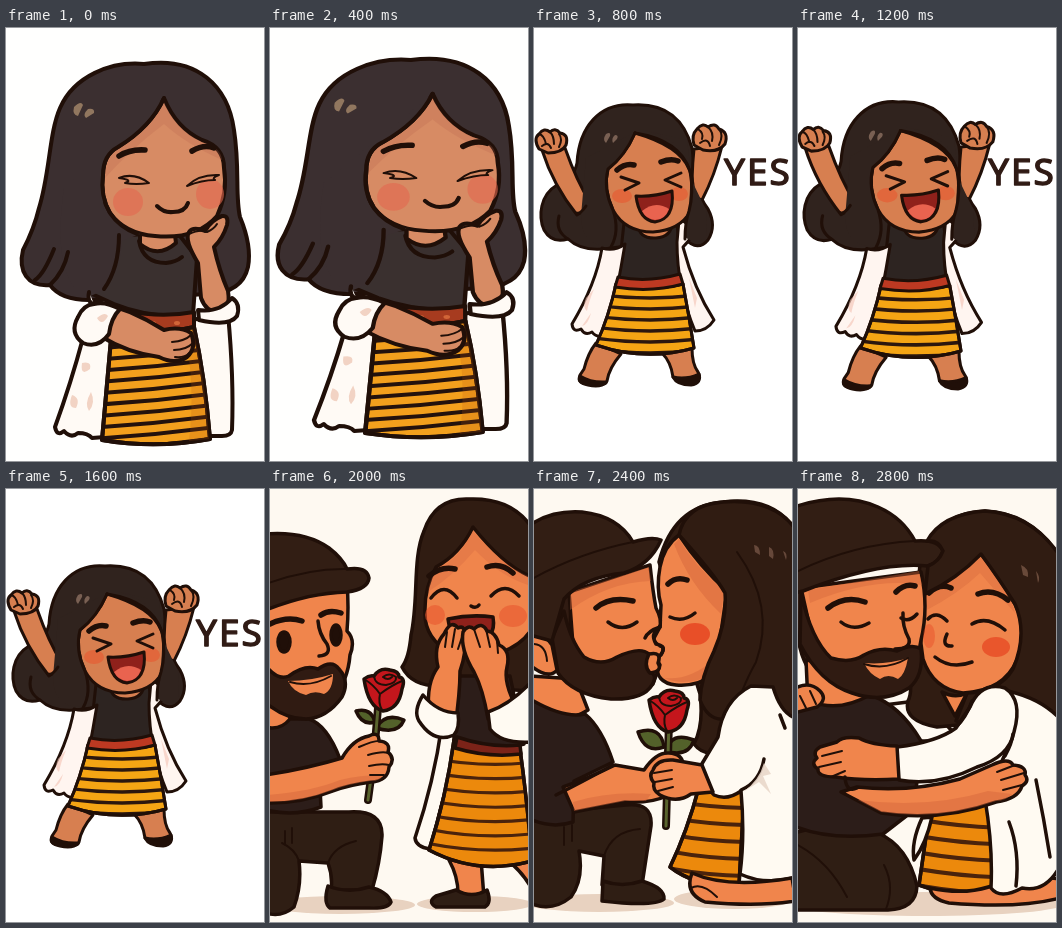
These frames come from a looping animation (258 by 433 pixels, 3.2 s). An HTML page:

```html
<!DOCTYPE html>
<html lang="en">
<head>
<meta charset="utf-8">
<title>Yes!</title>
<style>
html, body { margin: 0; width: 100%; height: 100%; overflow: hidden; background: #fff; }
svg { display: block; width: 100vw; height: 100vh; }
path, ellipse { stroke: #200f08; stroke-width: var(--pen); stroke-linecap: round; stroke-linejoin: round; }
.hair { fill: var(--hair); }
.skin { fill: var(--skin); }
.top { fill: var(--top); }
.robe { fill: var(--robe); }
.skirt { fill: var(--skirt); }
.belt { fill: var(--belt); }
.pants { fill: #2f1e14; }
.cap { fill: #321e14; }
.beard { fill: #301b12; }
.rose { fill: #c4161c; }
.leaf { fill: #53612a; }
.mouth { fill: #8f211b; }
.ink { fill: #200f08; }
.line { fill: none; }
.thin { fill: none; stroke-width: 2; }
.bands { fill: none; stroke: var(--band); }
.brow { fill: none; stroke-width: 5.5; }
.soft { stroke: none; }
text { font: 400 37px "Noto Sans", "Open Sans", sans-serif; letter-spacing: 2px; fill: #301b15; stroke: #301b15; stroke-width: 1.4; stroke-linejoin: round; }
</style>
</head>
<body>
<svg id="stage" viewBox="0 0 258 433" preserveAspectRatio="none"></svg>
<script>
let clipCount = 0;

const path = (kind, d) => `<path class="${kind}" d="${d}"/>`;
const oval = (kind, x, y, rx, ry = rx) => `<ellipse class="${kind}" cx="${x}" cy="${y}" rx="${rx}" ry="${ry}"/>`;
const tint = (color, opacity, d) => `<path class="soft" fill="${color}" opacity="${opacity}" d="${d}"/>`;
const blush = (x, y, rx, ry, color = '#e8562f', opacity = .6) =>
  `<ellipse class="soft" cx="${x}" cy="${y}" rx="${rx}" ry="${ry}" fill="${color}" opacity="${opacity}"/>`;
const ground = (x, y, rx, ry) => blush(x, y, rx, ry, '#e8d2c0', 1);

// A skirt with evenly spaced bands; x, y, dx, dy, bend describe the first band.
function skirt(d, { x, y, dx, dy, bend, step, count, width }) {
  const id = 'skirt' + clipCount++;
  let bands = '';
  for (let i = 0; i < count; i++)
    bands += `M${x} ${y + i * step}q${dx / 2} ${dy / 2 + bend} ${dx} ${dy}`;
  return `<clipPath id="${id}"><path d="${d}"/></clipPath>` + path('skirt', d) +
    `<path class="bands" clip-path="url(#${id})" style="stroke-width:${width}" d="${bands}"/>` + path('line', d);
}

const stem = d => `<path class="line" style="stroke-width:8" d="${d}"/><path class="line" style="stroke:#59632d;stroke-width:3" d="${d}"/>`;

const rose = (x, y) => `<g transform="translate(${x} ${y})">` +
  path('rose', 'M-20 -10Q-15 -14 -10 -13Q-4 -22 6 -19Q15 -18 15 -12Q22 -11 18 0Q15 20 -1 22Q-16 18 -20 -10Z') +
  path('thin', 'M-20 -10Q-10 -4 -4 5Q8 -4 18 -8M-10 -13Q-9 -4 2 -4Q13 -6 12 -12Q5 -17 -1 -12Q4 -8 8 -12M-4 5Q-6 14 -2 21') + '</g>';

const style = (pen, hair, skin, top, robe, yellow, belt, band) =>
  `--pen:${pen};--hair:${hair};--skin:${skin};--top:${top};--robe:${robe};--skirt:${yellow};--belt:${belt};--band:${band}`;
const scene = (look, background, parts) =>
  `<g style="${look}"><rect width="258" height="433" fill="${background}"/>${parts.join('')}</g>`;
const move = (transform, parts) => [`<g transform="${transform}">`, ...parts, '</g>'];

const dreaming = [
  path('hair', 'M138 36C105 33 68 48 54 80C43 105 44 145 33 180Q28 201 17 222C12 243 21 259 44 257Q55 272 83 272L202 266Q236 265 242 239Q246 218 234 189C229 168 234 140 228 102C222 58 191 28 138 36Z'),
  path('robe', 'M77 310Q65 355 49 399Q51 409 58 403Q65 411 72 405Q82 405 86 410L99 409L109 300Z'),
  path('robe', 'M185 292L222 286Q228 350 226 402Q225 408 216 408H201Z'),
  path('top', 'M108 208L139 206L174 208L191 230L187 287Q145 291 108 276L86 266Z'),
  path('skin', 'M134 200V216Q152 231 170 215L168 199Z'),
  path('line', 'M133 213Q137 235 160 235Q170 234 176 229'),
  path('skin', 'M158 70Q145 99 112 119Q97 127 97 147Q94 168 104 185Q119 206 149 208Q190 212 211 188Q222 165 218 140Q218 119 196 112Q170 100 158 70Z'),
  tint('#b9664b', .25, 'M158 74Q145 103 112 121Q100 128 99 150Q125 121 158 96Q180 116 216 132Q215 119 196 114Q170 102 158 74Z'),
  blush(122, 174, 15, 14, '#e3684f', .6), blush(204, 166, 14, 15, '#e3684f', .6),
  path('hair soft', 'M158 70Q138 102 110 121Q99 128 97 146V180Q111 198 134 206L116 213Q114 242 98 262L80 270Q45 250 58 160Z'),
  path('line', 'M158 70Q145 99 112 119Q97 127 97 147Q94 168 104 185Q113 199 131 206M113 207Q113 240 98 261M62 224Q58 244 44 257M48 221Q38 246 29 252'),
  path('brow', 'M113 128Q124 121 139 122M186 123Q198 116 208 120'),
  path('ink thin', 'M113 150Q128 144 143 155Q130 157 119 155Q128 152 113 150ZM181 158Q193 146 213 147Q205 150 209 152Q196 152 181 158Z'),
  path('line', 'M151 178Q158 185 167 184Q179 184 182 175'),
  path('skin', 'M192 235Q178 212 183 204Q187 198 199 203Q205 192 216 188Q223 187 221 197Q217 210 208 219Q213 242 222 263Q225 283 213 285Q200 284 195 270Z'),
  path('thin', 'M183 206Q194 201 201 204M201 204Q208 201 211 196'),
  path('robe', 'M192 282Q213 285 226 270Q235 276 231 288Q223 299 193 292Z'),
  path('belt', 'M120 283Q156 290 188 284L188 301Q153 306 110 301Z'),
  blush(146, 295, 4, 2, '#dd713e', .8), blush(171, 295, 3, 2, '#dd713e', .8),
  skirt('M106 300Q150 308 188 299Q199 350 204 411Q150 421 96 412Z',
    { x: 94, y: 320, dx: 113, dy: -11, bend: 2, step: 11.3, count: 10, width: 4 }),
  tint('#b95610', .2, 'M187 301Q199 350 203 411L183 413Q190 355 178 303Z'),
  path('skin', 'M88 273Q123 280 158 302Q174 298 185 305Q191 320 181 329Q169 337 153 329Q122 325 96 309Z'),
  path('thin', 'M166 314Q179 313 185 307M168 322Q180 322 187 315M169 329Q179 330 183 325'),
  path('robe', 'M83 264Q81 275 88 276Q99 273 114 281Q105 290 103 306Q92 321 77 315Q63 305 72 289Q77 277 88 276'),
  tint('#e9b9a4', .6, 'M91 290Q99 283 102 288Q96 299 91 290ZM76 335Q86 333 84 341Q74 349 76 335ZM66 367Q75 370 70 380Q61 380 66 367ZM85 364Q90 375 83 383Q78 376 85 364Z'),
  tint('#91775f', 1, 'M68 79Q75 72 77 77L72 88Q66 87 68 79ZM82 81Q89 80 88 85L80 90Q76 87 82 81Z')
];

const cheering = [
  path('hair', 'M99 77C66 74 45 99 43 135Q40 151 23 157C6 167 4 188 10 202Q18 216 34 211Q49 225 77 220L151 211Q164 224 174 212Q183 198 174 181C160 163 161 142 158 120C150 91 131 75 99 77Z'),
  path('skin', 'M62 315Q54 325 50 341L46 347Q42 357 57 355Q71 359 73 353Q75 340 87 326Z'),
  path('skin', 'M128 325Q137 334 139 349Q148 355 160 354Q168 351 164 344Q158 336 158 320Z'),
  path('ink', 'M46 348Q57 355 72 354Q67 360 54 357Q43 355 46 348ZM139 349Q152 352 165 346Q168 355 157 357Q143 357 139 349Z'),
  path('top', 'M90 195H143L149 247Q113 256 84 250Z'),
  path('skin', 'M104 195Q104 211 122 210Q138 209 138 194Z'),
  path('robe', 'M68 220Q62 256 38 296Q39 305 47 301Q51 308 58 304Q63 311 73 307Q83 265 91 216Q80 224 68 220Z'),
  path('robe', 'M145 192Q157 193 156 211Q152 216 149 219Q160 261 180 292Q173 303 161 303Q143 260 143 214Z'),
  tint('#f4c7b9', .65, 'M60 261Q55 273 53 283Q48 279 52 270ZM57 285Q54 297 48 298ZM155 250L163 270L161 280Z'),
  skirt('M82 256Q115 264 149 256Q155 288 160 320Q112 334 62 317Q75 288 82 256Z',
    { x: 60, y: 266, dx: 105, dy: 1, bend: 7, step: 11, count: 6, width: 3.5 }),
  path('belt', 'M84 249Q114 255 146 246L149 256Q117 265 81 259Z'),
  path('skin', 'M8 122Q19 157 43 187Q54 182 56 174Q43 154 31 120Z'),
  path('skin', 'M159 169Q157 149 160 121L188 118Q181 147 168 172Z'),
  path('skin', 'M5 121Q-1 111 5 106Q10 99 16 104Q21 99 26 105Q35 106 32 117Q28 125 14 125Z'),
  path('thin', 'M5 106Q10 107 12 116M16 104Q20 108 20 116M25 106Q29 111 25 119M8 118Q14 113 17 120'),
  path('skin', 'M160 117Q157 107 163 101Q169 94 174 99Q181 94 185 101Q195 104 191 116Q184 125 169 122Z'),
  path('thin', 'M164 101Q170 105 168 111M174 99Q180 104 178 113M185 101Q190 107 185 117M166 115Q174 109 176 118'),
  path('skin', 'M101 105Q91 128 74 141Q69 161 79 182Q91 204 119 204Q146 202 156 184Q163 160 155 141Q146 118 101 105Z'),
  path('hair soft', 'M101 104Q91 128 73 142Q71 174 83 190Q83 211 76 218Q47 219 47 188L52 130Z'),
  path('line', 'M101 105Q91 128 74 141Q69 161 79 182Q86 203 77 219M52 178Q46 187 42 185M34 211Q21 203 25 188'),
  path('hair soft', 'M105 101Q149 111 157 139L155 182Q150 192 151 209Q164 219 173 207L172 182L158 153L153 112Z'),
  path('line', 'M101 105Q146 112 156 143Q160 165 155 183Q151 194 151 211'),
  blush(88, 168, 10, 7), blush(145, 166, 9, 7),
  path('brow', 'M83 142Q91 135 100 137M127 134Q137 130 144 133'),
  path('line', 'M87 149L105 155L91 162M147 145L131 152L147 159'),
  path('mouth', 'M102 168Q120 169 138 163Q141 191 121 194Q105 192 102 168Z'),
  tint('#e9634f', 1, 'M108 183Q121 172 135 181Q131 192 121 192Q112 191 108 183Z'),
  tint('#796053', 1, 'M72 106Q77 103 76 108L72 115Q68 112 72 106ZM81 107Q85 107 83 111L79 115Q77 110 81 107Z')
];

const shout = '<text x="190" y="156.5">YES</text>';

const proposal = [
  ground(70, 416, 75, 9), ground(205, 415, 58, 8),
  path('pants', 'M-4 323H79Q113 321 112 347Q110 374 102 401H61Q63 388 58 374L29 372Q32 396 24 418Q11 429 -4 424Z'),
  path('thin', 'M29 372Q25 360 12 354M58 374Q64 357 86 352M15 342V356M22 339V354'),
  path('pants', 'M58 397Q78 405 99 398Q117 402 121 413Q118 420 99 419H60Q53 414 58 397Z'),
  path('skin', 'M-4 213L20 222V237Q6 248 -4 239Z'),
  path('top', 'M-4 238Q10 242 20 230L39 230Q57 236 70 270L49 280L51 318Q25 328 -4 321Z'),
  path('leaf', 'M105 233Q92 237 86 222Q101 218 105 233ZM106 239Q115 223 134 231Q128 246 106 239Z'),
  stem('M108 219Q104 270 98 311'),
  rose(114, 200),
  path('skin', 'M-4 286Q39 279 72 269Q83 250 99 247Q109 242 109 252Q121 253 118 263Q126 270 119 278Q118 292 101 293Q78 296 63 302Q30 315 -4 314Z'),
  tint('#d2653a', .45, 'M-4 306Q40 303 70 291Q90 286 112 286Q112 292 100 292Q78 295 63 301Q30 314 -4 313Z'),
  path('thin', 'M89 258Q105 251 110 252M98 266Q112 262 118 264M99 277Q112 274 119 276M100 286H114'),
  path('skin', 'M-4 98L77 94Q79 119 77 142Q86 151 80 166Q78 192 62 212L-4 216Z'),
  path('beard', 'M-4 177Q8 192 19 187Q35 175 48 180Q62 170 69 180Q80 192 72 208Q57 229 36 230Q15 230 -4 214Z'),
  path('skin soft', 'M18 192Q41 192 63 185Q63 201 54 205Q44 201 36 206Q23 203 18 192Z'),
  path('thin', 'M20 193Q40 199 61 187'),
  path('line', 'M48 132Q49 145 57 155Q62 166 49 167'),
  oval('ink', 14, 153, 6, 10), oval('ink', 66, 146, 5, 10),
  path('brow', 'M0 135Q17 127 32 132M51 126Q59 120 71 124'),
  path('cap', 'M-4 45Q35 42 59 59Q72 69 77 80Q97 77 99 89Q98 100 77 103Q38 104 -4 121Z'),
  path('thin', 'M-4 95Q39 79 78 80'),
  path('hair', 'M198 10Q165 9 154 42C142 70 149 110 141 146Q139 169 132 178Q142 198 172 197L262 202V39Q242 8 198 10Z'),
  path('skin', 'M179 371Q189 389 188 409H214L211 370ZM236 370Q252 382 262 400V365Z'),
  path('pants', 'M186 401Q202 410 217 401Q222 414 215 418H166Q157 413 166 407Z'),
  path('robe', 'M172 235Q164 293 145 349Q146 358 160 360L190 247Z'),
  path('top', 'M183 187H240L254 255Q217 266 184 251Z'),
  path('skin', 'M203 38Q190 65 166 78Q154 99 155 125Q155 150 181 164H230Q254 155 262 139V88Q234 77 203 38Z'),
  tint('#c85c3e', .25, 'M203 42Q190 69 167 80Q159 91 158 103Q183 87 205 61Q230 87 258 96V87Q230 75 203 42Z'),
  path('brow', 'M159 87Q171 77 185 80M217 78Q231 73 243 84'),
  path('line', 'M161 109Q174 92 187 109M221 107Q235 92 249 107M201 117Q206 120 209 116'),
  blush(165, 126, 10, 10), blush(243, 127, 14, 11),
  path('mouth', 'M178 130Q201 125 223 128Q227 151 202 156Q181 155 178 130Z'),
  skirt('M184 251Q219 264 250 260Q257 310 262 372Q208 387 159 361Q176 309 184 251Z',
    { x: 155, y: 268, dx: 110, dy: 5, bend: 9, step: 14.3, count: 7, width: 3.2 }),
  path('belt', 'M187 248Q219 259 250 256L251 265Q218 269 185 259Z'),
  path('skin', 'M159 222Q156 194 168 178Q163 157 174 145Q181 130 188 139Q196 135 194 149Q197 162 190 182Q190 204 185 238Z'),
  path('thin', 'M177 143L175 158M185 140L182 158M193 145L188 160'),
  path('skin', 'M218 230Q213 200 204 183Q190 160 193 143Q198 135 204 140Q212 132 217 142Q226 143 229 156Q241 161 237 178Q233 194 247 219Z'),
  path('thin', 'M204 140L210 158M216 140L220 158M227 151L228 164'),
  path('robe', 'M153 206Q168 224 188 224Q190 239 184 246Q164 255 149 232Q143 222 153 206Z'),
  path('robe', 'M218 223Q241 215 262 192V253Q231 255 220 240Z')
];

const kiss = [
  ground(65, 414, 75, 9), ground(200, 410, 60, 10),
  path('pants', 'M-4 325L92 316Q119 313 117 337L108 396H68L70 367L45 362Q50 390 37 408Q17 424 -4 414Z'),
  path('thin', 'M70 367Q78 342 106 340M30 338V356M38 336V352'),
  path('pants', 'M69 392Q88 399 108 392Q131 399 130 410Q121 418 68 412Z'),
  path('skin', 'M-4 187L42 190L54 221Q26 239 -4 219Z'),
  path('top', 'M-4 210Q30 230 51 225Q68 239 79 273L40 292L39 333Q18 340 -4 330Z'),
  path('hair', 'M125 73Q139 17 189 13Q240 7 262 42V239Q220 266 186 262Q170 268 160 255Q170 236 166 205Z'),
  path('skin', 'M145 46Q130 57 126 78Q122 99 127 116L126 138L119 151L126 158L123 174Q121 194 142 196Q163 198 181 185L193 102Q166 78 145 46Z'),
  tint('#d2653a', .45, 'M145 50Q160 76 190 102L187 125Q155 95 140 55ZM130 189Q155 192 181 170V184Q153 199 130 189Z'),
  path('beard', 'M14 96L40 98Q33 131 40 160L30 190Q15 170 14 96Z'),
  path('skin', 'M35 103L116 76Q119 104 122 119Q129 132 125 139Q116 145 122 155Q132 157 128 164Q122 170 126 176L119 195Q91 215 42 196Z'),
  tint('#d2653a', .4, 'M36 103L115 78L117 92Q75 93 36 121Z'),
  path('beard', 'M30 122Q36 151 50 168Q67 178 83 168Q106 157 115 165Q111 176 116 183Q124 186 118 196Q109 211 77 210Q39 206 24 184L18 149Z'),
  path('skin', 'M18 156Q6 139 -3 146V177Q15 191 23 181Z'),
  path('thin', 'M0 155Q12 156 13 172'),
  path('skin', 'M115 165Q128 162 124 174Q129 182 116 184Q109 177 115 165Z'),
  path('line', 'M126 138Q114 142 111 149M126 157Q132 157 127 166'),
  path('cap', 'M-4 36Q18 21 48 23Q84 27 99 53Q118 47 127 51Q116 76 90 84Q49 88 30 110L18 152L-4 146Z'),
  path('thin', 'M-4 91Q44 64 99 53'),
  path('brow', 'M62 119Q76 107 99 112M134 95Q142 87 153 91'),
  path('line', 'M74 133Q88 144 103 133M136 128Q149 134 161 124'),
  blush(161, 145, 15, 11, '#e53d1c', .75),
  path('hair', 'M145 46Q181 86 191 104Q193 132 180 162Q167 188 166 211Q174 232 191 230Q207 240 226 224L262 230V41Q240 9 189 13Q151 16 145 46Z'),
  path('thin', 'M203 63Q242 117 222 173Q206 202 202 223'),
  tint('#66483a', 1, 'M220 56Q226 56 226 66L221 63ZM235 58Q241 60 239 70L235 67ZM249 62Q254 64 252 71Z'),
  skirt('M165 298L211 290L205 396Q163 399 136 378Q153 343 165 298Z',
    { x: 128, y: 310, dx: 85, dy: 9, bend: 4, step: 17, count: 5, width: 4 }),
  path('robe', 'M217 197Q189 211 184 248L166 278Q170 298 180 306Q193 312 207 302Q211 347 206 385Q232 397 262 388V229Q247 225 239 198Z'),
  path('line', 'M207 301Q226 293 230 270M246 226L251 239'),
  tint('#e9d7ca', .9, 'M209 303Q225 292 230 274L237 285L229 287L237 305L225 293Z'),
  path('skin', 'M158 384Q193 400 258 389L262 412Q224 418 171 413Q150 404 158 384Z'),
  path('thin', 'M157 399Q168 393 183 408'),
  path('leaf', 'M130 258Q111 265 104 243Q127 236 130 258ZM132 262Q137 242 160 251Q154 269 132 262Z'),
  stem('M135 232L132 337'),
  rose(135, 221),
  path('skin', 'M29 298Q57 288 81 276L110 281Q122 263 135 264Q149 265 149 276L135 306Q116 315 91 313L40 323Z'),
  path('skin', 'M168 276L139 271Q123 270 119 281Q114 287 120 294Q118 301 126 306Q143 315 157 305L179 303Z'),
  tint('#d2653a', .45, 'M39 313Q75 302 117 305L112 312L91 312L40 322Z'),
  path('thin', 'M120 284L138 281M121 293L138 290M124 302L139 298'),
  path('line', 'M22 306Q46 294 79 276')
];

const embrace = [
  ground(128, 415, 138, 12),
  path('robe', 'M86 216L126 211L163 252H98Z'),
  path('pants', 'M-4 344Q41 331 80 344Q110 357 119 397Q118 420 90 421H-4Z'),
  path('thin', 'M-4 354Q30 371 49 408M86 376Q97 397 88 420'),
  path('hair', 'M122 75Q136 24 187 22Q235 24 262 69V232L201 232L139 238Q105 232 110 212Q114 204 112 190Z'),
  path('beard', 'M-4 98L20 98L30 185L12 182Q-4 160 -4 98Z'),
  path('skin', 'M8 171L10 215Q48 240 75 211L70 179Z'),
  path('top', 'M-4 224L12 212Q40 224 72 206Q102 216 123 252L116 321L85 345Q32 352 -4 337Z'),
  path('skin', 'M-4 200Q11 191 22 202Q30 210 19 218L-4 224Z'),
  path('thin', 'M2 207L8 219M12 202L18 215'),
  path('skin', 'M183 65Q154 89 127 105Q119 137 125 170Q135 200 165 204Q206 202 219 171Q230 140 217 115Q201 88 183 65Z'),
  tint('#d2653a', .35, 'M183 68Q154 92 128 107L127 122Q160 105 182 84Q200 105 217 124Q210 95 183 68Z'),
  path('skin', 'M3 99L123 83Q131 118 123 151L117 184Q74 215 21 179Z'),
  tint('#d2653a', .4, 'M10 101L121 82L124 96Q75 88 12 114Z'),
  path('beard', 'M3 104Q13 150 33 169Q53 175 66 166Q82 157 99 162Q114 154 123 160Q126 187 111 199Q86 215 54 204Q22 194 2 155Z'),
  path('skin soft', 'M66 174Q89 176 110 169Q107 186 100 190Q90 184 82 190Q71 185 66 174Z'),
  path('thin', 'M66 175Q88 182 110 169'),
  path('line', 'M105 124Q104 137 111 150Q113 160 97 160'),
  path('brow', 'M30 119Q47 106 67 113M98 103Q107 94 117 97M131 104Q142 94 153 99M180 105Q195 99 210 111'),
  path('line', 'M43 133Q55 143 71 134M103 129Q111 134 119 125M130 130Q138 121 149 132M174 135Q189 126 207 141M149 145Q143 158 154 157M137 168Q153 181 174 173'),
  blush(198, 158, 14, 10, '#e53d1c', .65), blush(131, 147, 6, 12, '#e53d1c', .35),
  path('cap', 'M-4 18Q44 2 80 18Q105 29 117 52Q140 50 145 62Q141 73 130 77Q82 72 5 102L-4 104Z'),
  path('thin', 'M-4 84Q54 55 117 52'),
  path('hair', 'M183 65Q202 91 217 115Q230 145 215 180Q201 203 169 204L158 232Q195 247 262 232V67Q234 25 187 22Q144 25 129 52Q140 50 145 62Q141 73 130 77L127 105Q159 90 183 65Z'),
  path('skin', 'M144 203Q157 210 169 204L157 227Z'),
  tint('#694a3a', 1, 'M223 76Q231 79 230 88L225 86ZM238 82Q243 88 240 94Z'),
  skirt('M133 313L192 300L200 403Q161 411 121 396Z',
    { x: 112, y: 329, dx: 96, dy: 10, bend: 4, step: 16.5, count: 5, width: 4 }),
  path('skin', 'M132 399Q182 410 216 385L262 390V409Q222 420 151 414Q133 410 132 399Z'),
  path('robe', 'M210 202Q244 210 262 230V377Q248 404 224 399Q202 411 193 399Q195 357 187 310L208 263Z'),
  path('line', 'M211 333Q222 362 218 397M238 291Q246 330 252 368'),
  path('skin', 'M59 298Q111 304 162 290L194 276Q211 268 215 276Q229 277 227 286Q232 292 224 297Q220 310 198 313Q142 333 83 324L43 303Z'),
  tint('#d2653a', .45, 'M60 311Q130 320 190 302L214 305Q208 312 198 312Q142 332 83 323Z'),
  path('thin', 'M199 283L217 276M203 291L226 284M205 301L224 296'),
  path('robe', 'M172 218Q183 192 207 199Q225 211 216 243Q211 268 179 278Q139 298 101 291Q95 273 99 258Q139 253 158 239Z'),
  path('line', 'M207 267Q214 254 215 245M158 238Q168 229 174 212'),
  path('skin', 'M99 257Q73 256 61 249Q44 247 39 253L22 258Q14 263 19 269Q12 275 20 280Q19 288 38 288Q64 292 101 290Z'),
  path('thin', 'M24 267L44 262M21 278L43 273M33 288L47 282'),
  path('robe', 'M134 328Q128 355 116 371Q113 353 124 329Z'),
  path('line', 'M47 288Q48 304 59 299')
];

const bigLook = style(4, '#3b2f30', '#d78b64', '#3a302f', '#fffaf5', '#f3a01d', '#a73b1f', '#23120d');
const smallLook = style(3, '#30231e', '#d77f50', '#2d2421', '#fff5f0', '#f5a514', '#bd3922', '#2b170e');
const pairLook = style(3.5, '#301c12', '#f0854c', '#2c1d19', '#fffaf2', '#ec890c', '#7b2318', '#4a230c');
const cream = '#fef9f1';

const stage = document.getElementById('stage');
stage.innerHTML = [
  scene(bigLook, '#fffffe', dreaming),
  scene(bigLook, '#fffffe', move('translate(-9.3 -3.7) scale(1.088 .992)', dreaming)),
  scene(smallLook, '#fff', [...cheering, shout]),
  scene(smallLook, '#fff', [...move('translate(-1 -5) scale(1.025)', cheering), shout]),
  scene(pairLook, cream, proposal),
  scene(pairLook, cream, kiss),
  scene(pairLook, cream, embrace)
].join('');

const order = [0, 1, 2, 3, 2, 4, 5, 6];
const scenes = [...stage.children];

function draw(now) {
  const current = order[Math.floor(now % 3200 / 400)];
  scenes.forEach((group, i) => group.style.display = i === current ? '' : 'none');
  requestAnimationFrame(draw);
}
draw(performance.now());
</script>
</body>
</html>
```
